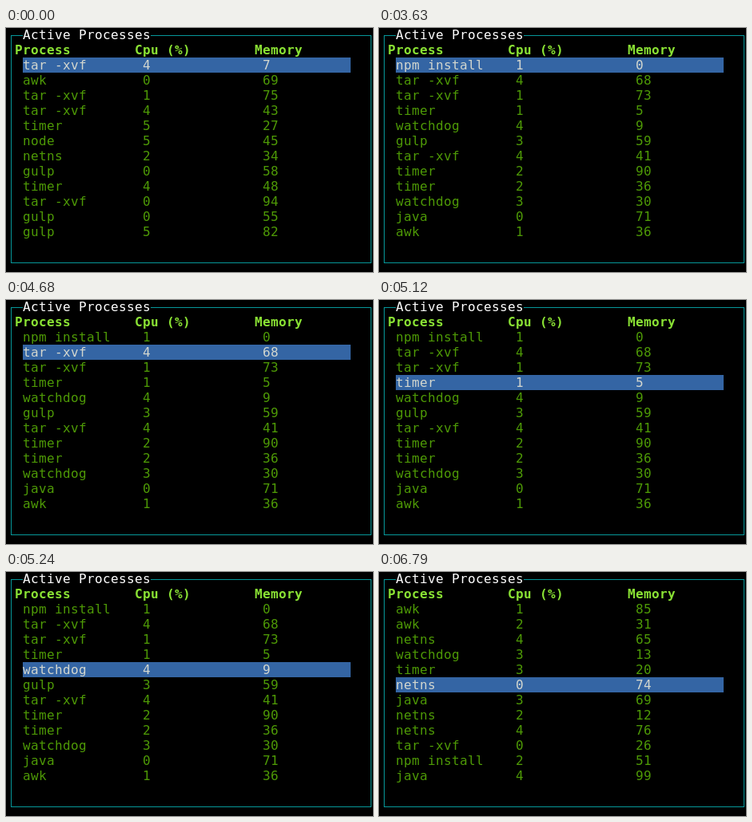
These frames come from a looping animation (459x306 px, 8000 ms). An HTML page with a canvas:

```html
<!DOCTYPE html>
<html lang="en">
<head>
<meta charset="utf-8">
<title>Active Processes</title>
<style>
  html, body { margin: 0; width: 100%; height: 100%; overflow: hidden; background: #000; }
  canvas { display: block; }
</style>
</head>
<body>
<canvas id="stage" width="459" height="306"></canvas>
<script>
const ctx = document.getElementById('stage').getContext('2d');
const LOOP = 8000;
const CELL_W = 10, CELL_H = 19, LEFT = 1, TOP = -1, ASCENT = 15;
const FONT = '16px "DejaVu Sans Mono", monospace';
const COLOR = {
  back: '#000', border: '#06989a', title: '#fff', head: '#8ae234',
  row: '#4e9a06', bar: '#3465a4', picked: '#d3d7cf'
};

// Each snapshot lists its rows as "process,cpu,memory".
const snapshots = [
  { at: 0, rows: 'tar -xvf,4,7|awk,0,69|tar -xvf,1,75|tar -xvf,4,43|timer,5,27|node,5,45|' +
    'netns,2,34|gulp,0,58|timer,4,48|tar -xvf,0,94|gulp,0,55|gulp,5,82' },
  { at: 500, rows: 'timer,5,44|watchdog,0,69|timer,1,99|~/ls -l,3,51|tar -xvf,2,25|awk,3,3|' +
    'gulp,1,87|watchdog,2,68|java,2,1|gulp,1,72|~/ls -l,1,81|netns,4,72' },
  { at: 3630, rows: 'npm install,1,0|tar -xvf,4,68|tar -xvf,1,73|timer,1,5|watchdog,4,9|gulp,3,59|' +
    'tar -xvf,4,41|timer,2,90|timer,2,36|watchdog,3,30|java,0,71|awk,1,36' },
  { at: 6790, rows: 'awk,1,85|awk,2,31|netns,4,65|watchdog,3,13|timer,3,20|netns,0,74|' +
    'java,3,69|netns,2,12|netns,4,76|tar -xvf,0,26|npm install,2,51|java,4,99' }
].map(s => ({ at: s.at, rows: s.rows.split('|').map(r => r.split(',')) }));

// Times at which the selection moves down one row.
const keyPresses = [4680, 4930, 5120, 5240, 5480];

const cellX = col => LEFT + col * CELL_W;
const cellY = line => TOP + line * CELL_H;

// Terminal text: one glyph per cell.
function print(text, col, line, color, bold) {
  ctx.font = (bold ? 'bold ' : '') + FONT;
  ctx.fillStyle = color;
  [...text].forEach((ch, i) => ctx.fillText(ch, cellX(col + i), cellY(line) + ASCENT));
}

function printRow(cells, col, line, color, bold) {
  cells.forEach((text, i) => print(text, col + i * 15, line, color, bold));
}

function drawFrame() {
  const x0 = cellX(0) + 5, x1 = cellX(45) + 5;
  const y0 = cellY(0) + 10, y1 = cellY(15) + 10;
  ctx.fillStyle = COLOR.border;
  ctx.fillRect(x0, y0, cellX(2) - x0, 1);
  ctx.fillRect(cellX(18), y0, x1 - cellX(18), 1);
  ctx.fillRect(x0, y1, x1 - x0 + 1, 1);
  ctx.fillRect(x0, y0, 1, y1 - y0);
  ctx.fillRect(x1, y0, 1, y1 - y0);
}

function draw(t) {
  const { rows } = snapshots.findLast(s => s.at <= t);
  const selected = keyPresses.filter(at => at <= t).length;

  ctx.fillStyle = COLOR.back;
  ctx.fillRect(0, 0, 459, 306);
  drawFrame();
  print('Active Processes', 2, 0, COLOR.title);
  printRow(['Process', 'Cpu (%)', 'Memory'], 1, 1, COLOR.head, true);

  ctx.fillStyle = COLOR.bar;
  ctx.fillRect(cellX(2), cellY(2 + selected), 41 * CELL_W, CELL_H);
  rows.forEach((cells, i) =>
    printRow(cells, 2, 2 + i, i === selected ? COLOR.picked : COLOR.row));
}

const start = performance.now();
function tick() {
  draw((performance.now() - start) % LOOP);
  requestAnimationFrame(tick);
}
tick();
</script>
</body>
</html>
```
